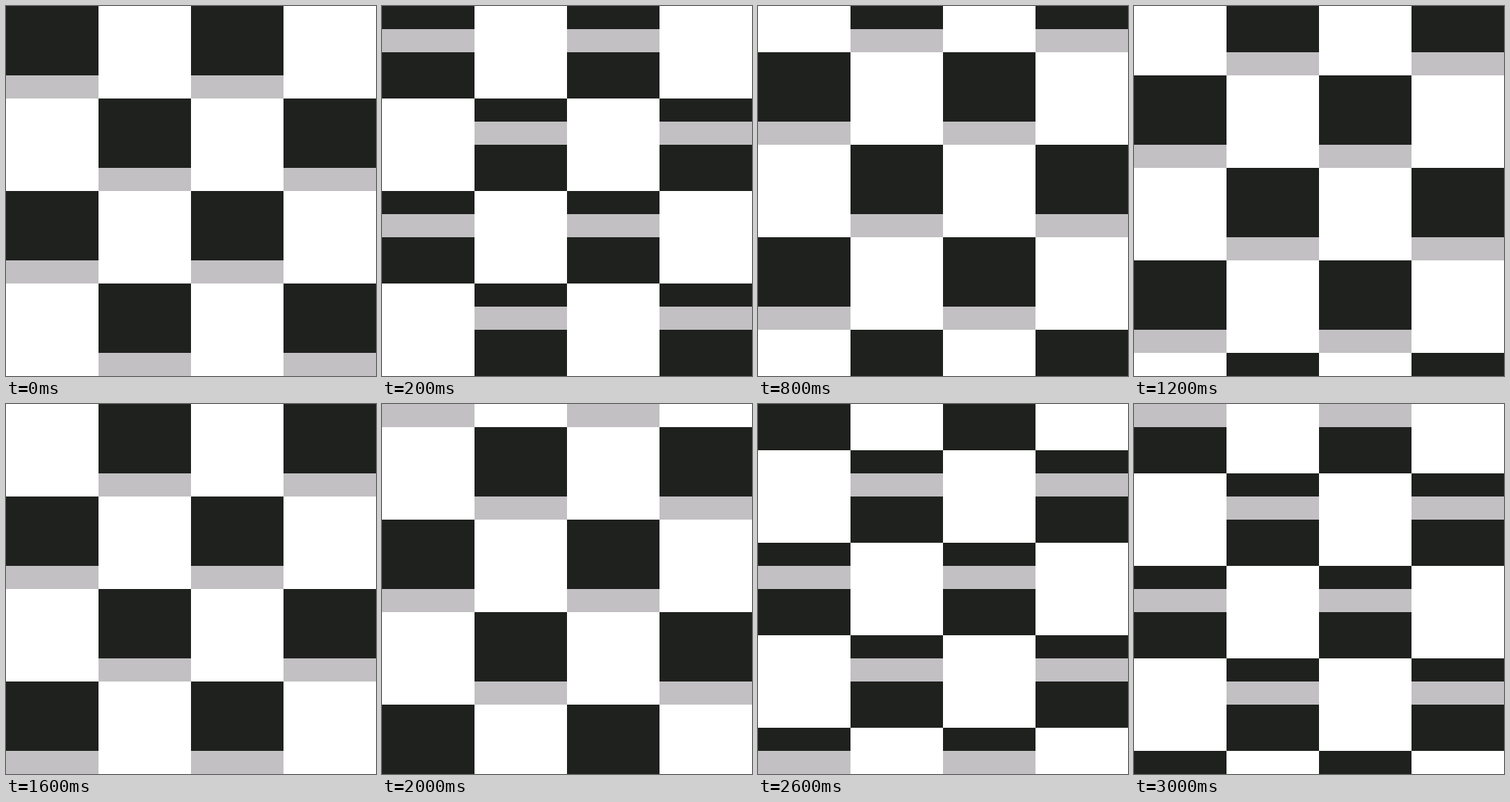
An HTML page with a canvas that plays this animation: 480 by 480 pixels, repeating every 3100 ms.

```html
<!DOCTYPE html>
<html lang="en">
<head>
<meta charset="utf-8">
<title>Sliding checkerboard</title>
<style>
  html, body { margin: 0; width: 100%; height: 100%; overflow: hidden; background: #fff; }
  canvas { display: block; }
</style>
</head>
<body>
<canvas id="stage" width="480" height="480"></canvas>
<script>
const ctx = document.getElementById('stage').getContext('2d');
const SIZE = 480, CELL = 120, BAND = 30;
const STEP_MS = 100, LOOP_MS = 3100;

function rect(color, x, y, w, h) {
  ctx.fillStyle = color;
  ctx.fillRect(x, y, w, h);
}

// The band climbs one notch per step; every fourth step the blocks drop one notch.
function draw(time) {
  const step = Math.floor((time % LOOP_MS) / STEP_MS);
  const drop = Math.floor(step / 4) * BAND;
  const bandOffset = (3 - step % 4) * BAND;

  rect('#fff', 0, 0, SIZE, SIZE);
  for (let col = 0; col < 4; col++) {
    const x = col * CELL;
    const first = drop + (col % 2) * CELL - 2 * CELL;
    for (let y = first; y < SIZE; y += 2 * CELL) {
      rect('#1f211e', x, y, CELL, CELL);
      rect('#c2c0c3', x, y + bandOffset, CELL, BAND);
    }
  }
}

const start = performance.now();
function tick() {
  draw(performance.now() - start);
  requestAnimationFrame(tick);
}
tick();
</script>
</body>
</html>
```
